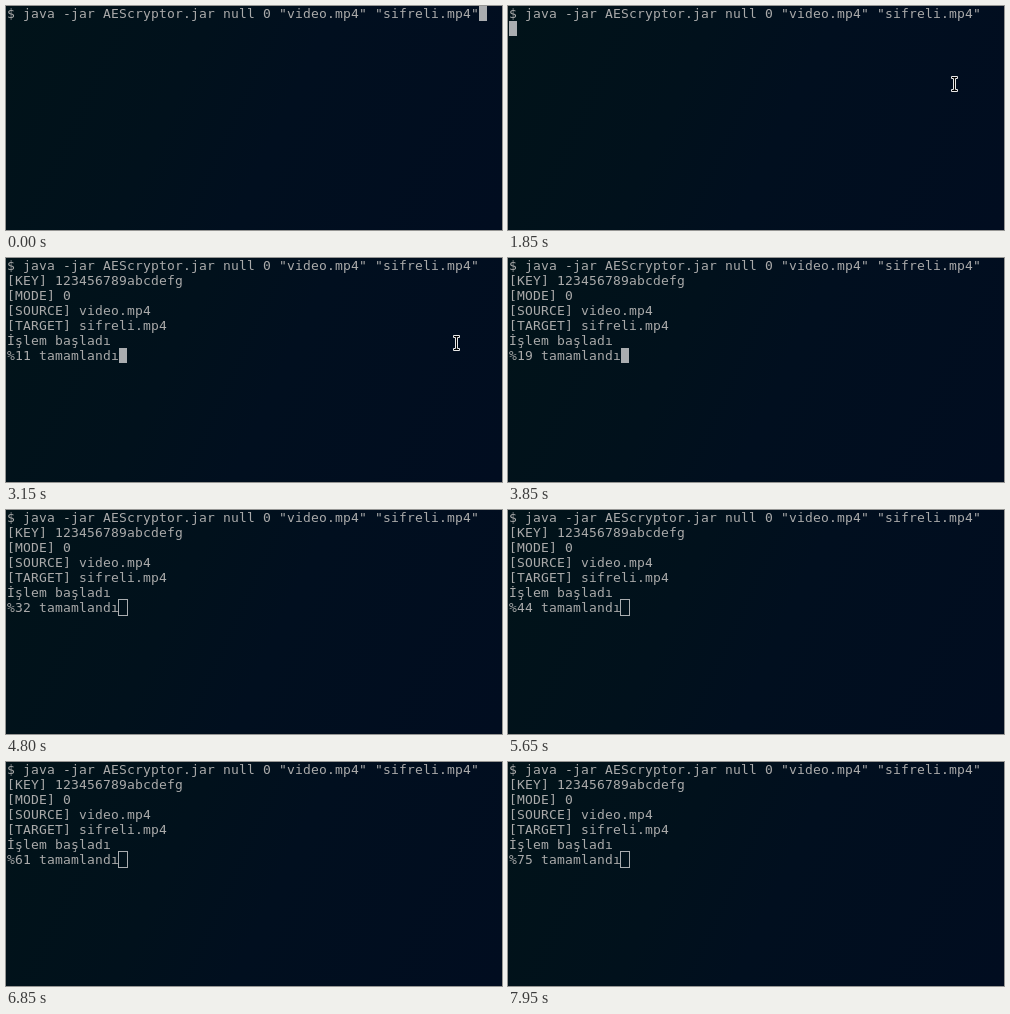
An HTML page for the animation above (8000 ms loop, 496 px wide and 224 px high).

```html
<!DOCTYPE html>
<html lang="tr">
<head>
<meta charset="utf-8">
<title>Terminal</title>
<style>
  html, body { margin: 0; width: 100%; height: 100%; overflow: hidden; background: #01101c; }
  #stage {
    position: relative; width: 496px; height: 224px; overflow: hidden;
    background: linear-gradient(115deg, #011319 0%, #01111c 35%, #010f1f 55%, #010d20 100%);
  }
  pre {
    position: absolute; left: 1px; top: 0; margin: 0; color: #aaa;
    font: 13px/15px "DejaVu Sans Mono", monospace;
    letter-spacing: calc(8px - 1ch); /* whole-pixel terminal cells */
    font-variant-ligatures: none;
  }
  #caret { position: absolute; width: 8px; height: 15px; background: #aaadb0; }
  #caret.hollow {
    margin: -1px 0 0 -1px; width: 10px; height: 17px; box-sizing: border-box;
    background: none; border: 1px solid #aaadb0;
  }
  #beam { position: absolute; left: -4px; top: -8px; }
</style>
</head>
<body>
<div id="stage">
  <pre id="text"></pre>
  <div id="caret"></div>
  <svg id="beam" width="7" height="16" viewBox="0 0 7 16">
    <path d="M.5.5H6.5V2.5H4.5V13.5H6.5V15.5H.5V13.5H2.5V2.5H.5Z" fill="#000" stroke="#e8e8e8"/>
  </svg>
</div>
<script>
const LOOP = 8000, TICK = 50, CELL = 8, ROW = 15;
const ENTER = 1850, REPORT = 2150, COUNT = 2250, BLUR = 4750;
const SHOW = 400, REST = 550, LEAVE = 3050, HIDE = 3350;

const text = document.getElementById("text");
const caret = document.getElementById("caret");
const beam = document.getElementById("beam");

const command = '$ java -jar AEScryptor.jar null 0 "video.mp4" "sifreli.mp4"';
const report = [
  "[KEY] 123456789abcdefg",
  "[MODE] 0",
  "[SOURCE] video.mp4",
  "[TARGET] sifreli.mp4"
];

// Percent done at a few moments
const progress = [[COUNT, 0], [3850, 19], [6850, 61], [LOOP - TICK, 75]];

const clamp = v => Math.min(1, Math.max(0, v));
const ramp = (t, from, to) => clamp((t - from) / (to - from));

function percentAt(t) {
  let p = 0;
  for (let i = 1; i < progress.length; i++) {
    const [t0, p0] = progress[i - 1], [t1, p1] = progress[i];
    p += (p1 - p0) * ramp(t, t0, t1);
  }
  return Math.round(p);
}

function linesAt(t) {
  if (t < ENTER) return [command];
  if (t < REPORT) return [command, ""];
  const lines = [command, ...report];
  if (t < REPORT + TICK) return [...lines, ""];
  lines.push("İşlem başladı");
  lines.push(t < COUNT ? "" : `%${percentAt(t)} tamamlandı`);
  return lines;
}

function drawBeam(t) {
  const visible = t >= SHOW && t < HIDE;
  beam.style.display = visible ? "block" : "none";
  const arrive = 1 - ramp(t, SHOW, REST);
  const leave = ramp(t, LEAVE, HIDE - TICK) ** 2;
  const x = Math.round(447 + 15 * arrive + 28 * leave);
  const y = Math.round(78 + 4 * arrive + 45 * leave);
  beam.style.transform = `translate(${x}px, ${y}px)`;
}

function draw(time) {
  const t = Math.floor((time % LOOP) / TICK) * TICK;
  const lines = linesAt(t), row = lines.length - 1;
  const content = lines.join("\n");
  if (text.textContent !== content) text.textContent = content;

  caret.style.left = 1 + lines[row].length * CELL + "px";
  caret.style.top = row * ROW + "px";
  caret.className = t >= BLUR ? "hollow" : "";
  drawBeam(t);
}

const start = performance.now();
function frame() {
  draw(performance.now() - start);
  requestAnimationFrame(frame);
}
frame();
</script>
</body>
</html>
```
